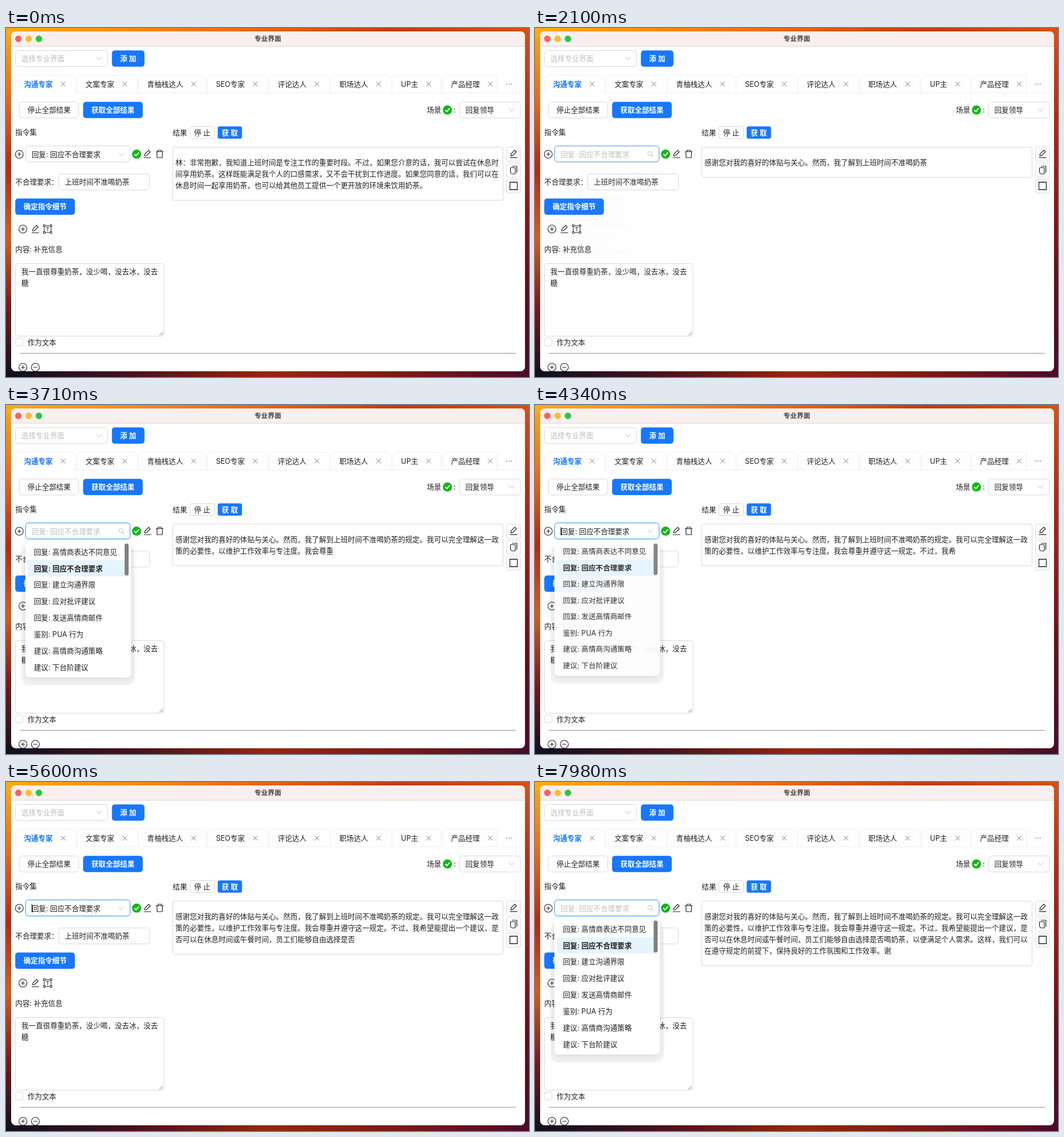
Recreate the animation shown at these times as an HTML page with a canvas. Size 917 by 611 pixels, loop 8 s.

```html
<!DOCTYPE html>
<html lang="zh-CN">
<head>
<meta charset="utf-8">
<title>专业界面</title>
<style>
html, body { margin: 0; width: 100%; height: 100%; overflow: hidden; background: #a02414; }
canvas { display: block; width: 917px; height: 611px; }
</style>
</head>
<body>
<canvas id="stage"></canvas>
<script>
const W = 917, H = 611, LOOP = 8000, EM = 12.6;
const ROW = 19.85, ROW_CHARS = 45, OPTION_H = 28.85;
const FONT = "Inter, 'Noto Sans CJK SC', 'Noto Sans CJK', sans-serif";
const BLUE = '#1677ff', INK = '#1f1f1f', LINE = '#d9d9d9', PALE = '#bfbfbf';

// Moments of the story, in ms
const CLEAR = 700, HOVER = 1540, OPEN = 2100, PICK = 4226, BLUR = 6800, REOPEN = 7280;
const BEAT = 140, BLINK = 475, FADE = 200;

const OLD_REPLY = '林：非常抱歉，我知道上班时间是专注工作的重要时段。不过，如果您介意的话，我可以尝试在休息时' +
  '间享用奶茶。这样既能满足我个人的口感需求，又不会干扰到工作进度。如果您同意的话，我们可以在' +
  '休息时间一起享用奶茶，也可以给其他员工提供一个更开放的环境来饮用奶茶。';
const NEW_REPLY = '感谢您对我的喜好的体贴与关心。然而，我了解到上班时间不准喝奶茶的规定。我可以完全理解这一政' +
  '策的必要性，以维护工作效率与专注度。我会尊重并遵守这一规定。不过，我希望能提出一个建议，是' +
  '否可以在休息时间或午餐时间，员工们能够自由选择是否喝奶茶，以便满足个人需求。这样，我们可以' +
  '在遵守规定的前提下，保持良好的工作氛围和工作效率。谢';
const OPTIONS = ['回复: 高情商表达不同意见', '回复: 回应不合理要求', '回复: 建立沟通界限', '回复: 应对批评建议',
  '回复: 发送高情商邮件', '鉴别: PUA 行为', '建议: 高情商沟通策略', '建议: 下台阶建议'];
const TABS = ['沟通专家', '文案专家', '青柚栈达人', 'SEO专家', '评论达人', '职场达人', 'UP主', '产品经理'];

// Typing pace: [time, characters received]
const PACE = [[CLEAR, 0], [OPEN, 31], [2660, 49], [4340, 80], [5600, 115], [7280, 148], [7980, 161]];

const canvas = document.getElementById('stage');
const c = canvas.getContext('2d');
const dpr = window.devicePixelRatio || 1;
canvas.width = W * dpr;
canvas.height = H * dpr;

const clamp = v => Math.max(0, Math.min(1, v));
const since = (t, start) => clamp((t - start) / FADE);

function received(t) {
  const q = Math.floor(t / BEAT) * BEAT;
  const i = PACE.findIndex(p => p[0] > q);
  if (i < 0) return NEW_REPLY.length;
  const [t0, n0] = PACE[i - 1], [t1, n1] = PACE[i];
  return Math.floor(n0 + (n1 - n0) * (q - t0) / (t1 - t0));
}

function setFont(weight, size = EM) {
  c.font = `${weight} ${size}px ${FONT}`;
}

function text(s, x, cy, color = INK, weight = 400, size = EM, align = 'left') {
  setFont(weight, size);
  c.fillStyle = color;
  c.textAlign = align;
  c.fillText(s, x, cy + size * .37);
}

function box(x, y, w, h, radius, fill, stroke, width = 1) {
  c.beginPath();
  c.roundRect(x, y, w, h, radius);
  if (fill) { c.fillStyle = fill; c.fill(); }
  if (stroke) { c.strokeStyle = stroke; c.lineWidth = width; c.stroke(); }
}

function fillRect(x, y, w, h, color) {
  c.fillStyle = color;
  c.fillRect(x, y, w, h);
}

// Each path is a flat list of x, y pairs around (x, y)
function strokes(x, y, color, width, ...paths) {
  c.beginPath();
  for (const p of paths)
    for (let i = 0; i < p.length; i += 2) c[i ? 'lineTo' : 'moveTo'](x + p[i], y + p[i + 1]);
  c.strokeStyle = color;
  c.lineWidth = width;
  c.stroke();
}

function disc(x, y, r, fill, stroke, width = 1.1) {
  c.beginPath();
  c.arc(x, y, r, 0, 7);
  if (fill) { c.fillStyle = fill; c.fill(); }
  if (stroke) { c.strokeStyle = stroke; c.lineWidth = width; c.stroke(); }
}

const chevron = (x, y) => strokes(x, y, PALE, 1, [-4.5, -2.3, 0, 2.7, 4.5, -2.3]);
const cross = (x, y) => strokes(x, y, '#777', 1, [-4, -4, 4, 4], [4, -4, -4, 4]);

function circled(x, y, plus) {
  disc(x, y, 7, null, INK);
  strokes(x, y, INK, 1.1, [-3.5, 0, 3.5, 0], plus ? [0, -3.5, 0, 3.5] : []);
}

function tick(x, y) {
  disc(x, y, 8, '#0fb812');
  strokes(x, y, '#fff', 1.9, [-4, 0, -1, 3, 4, -3]);
}

function pencil(x, y) {
  strokes(x, y, INK, 1.2, [-6.5, 6.5, 6.5, 6.5]);
  c.save();
  c.translate(x - 5, y + 3.5);
  c.rotate(-Math.PI / 4);
  strokes(0, 0, INK, 1.2, [0, 0, 3, -2, 12, -2, 12, 2, 3, 2, 0, 0]);
  c.restore();
}

function trash(x, y) {
  strokes(x, y, INK, 1.2, [-6.5, -4, 6.5, -4], [-5, -4, -4.5, 6.5, 4.5, 6.5, 5, -4]);
  box(x - 3, y - 6.5, 6, 2.5, 0, null, INK, 1.2);
}

function textFrame(x, y) {
  box(x - 6, y - 6, 12, 12, 0, null, INK);
  strokes(x, y, INK, 1, [-3, -3, 3, -3], [0, -3, 0, 3.5]);
  for (const dx of [-6, 6])
    for (const dy of [-6, 6]) box(x + dx - 1.5, y + dy - 1.5, 3, 3, 0, '#fff', INK);
}

function pages(x, y) {
  strokes(x, y, INK, 1.2, [-3, -7, 5.7, -7, 5.7, 4.5]);
  box(x - 5.5, y - 4.5, 8.5, 11, [1, 1, 1, 4], null, INK, 1.2);
}

const field = (x, y, w, h = 28, r = 5) => box(x, y, w, h, r, '#fff', LINE);

function button(label, x, y, w, primary, h = 28, r = 5) {
  if (primary) box(x - .3, y - .3, w + .6, h + .6, r, BLUE);
  else field(x, y, w, h, r);
  text(label, x + w / 2, y + h / 2, primary ? '#fff' : INK, primary ? 600 : 400, EM, 'center');
}

function strip(x, y, w, h, ...colors) {
  const g = w > h ? c.createLinearGradient(0, 0, W, 0) : c.createLinearGradient(0, 0, 0, H);
  colors.forEach((k, i) => g.addColorStop(i / (colors.length - 1), k));
  fillRect(x, y, w, h, g);
}

function wallpaper() {
  strip(0, H - 20, W, 20, '#0e1020', '#4a121c', '#96260f', '#7a1a18', '#4a0c28');
  strip(0, 0, 20, H, '#ffaa10', '#ee6a10', '#b8280e', '#dc5a18', '#7c1818', '#0e1020');
  strip(W - 20, 0, 20, H, '#d85014', '#b32a12', '#901814', '#5c0e1c', '#4a0c28');
  strip(0, 0, W, 14, '#ffaa10', '#f68a14', '#e8640f', '#c23a0e', '#d85014');
}

function titleBar() {
  fillRect(9, 6, 901, 26, '#f8efee');
  fillRect(9, 31.5, 901, 1, '#ddd5d4');
  ['#ff5f57', '#febc2e', '#28c840'].forEach((k, i) => disc(21.7 + 18 * i, 19, 5.7, k));
  text('专业界面', 459, 18.5, '#484242', 700, 11.8, 'center');
}

function tabs() {
  fillRect(16, 113, 886, 1, '#f0f0f0');
  c.save();
  c.beginPath();
  c.rect(16, 80, 842.5, 34);
  c.clip();
  let x = 16;
  TABS.forEach((label, i) => {
    setFont(400);
    const w = c.measureText(label).width;
    box(Math.round(x) + .5, 82.5, w + 55.6, 31, [7, 7, 0, 0], '#fefefe', '#f0f0f0');
    if (!i) fillRect(17, 112, w + 54, 2, '#fff');
    text(label, x + 15.4, 98, i ? INK : BLUE, i ? 400 : 600);
    cross(x + w + 33.8, 98.3);
    x += w + 57.7;
  });
  c.restore();
  fillRect(861, 82, 1, 32, '#e9e9e9');
  for (const dx of [-4, 0, 4]) disc(882 + dx, 98.3, .8, '#444');
}

function form() {
  field(16.5, 39.5, 161.5);
  text('选择专业界面', 27, 53.5, PALE);
  chevron(163, 53.3);
  button('添 加', 186, 39.5, 56.5, true);
  tabs();

  button('停止全部结果', 23.5, 129.5, 104);
  button('获取全部结果', 135.5, 129.5, 104, true);
  text('场景', 738, 143.5);
  tick(774, 143.5);
  text(':', 785, 143.5);
  field(795.5, 129.5, 106.5);
  text('回复领导', 805.5, 143.5);
  chevron(886.5, 143.3);

  text('指令集', 16.3, 182.5);
  text('结果', 292.3, 183);
  button('停 止', 322.5, 172.5, 43, false, 21, 3.5);
  button('获 取', 371.5, 172.5, 42, true, 21, 3.5);

  circled(23.3, 221, true);
  tick(229, 220.8);
  pencil(248, 220.5);
  trash(269.5, 220.5);
  text('不合理要求：', 16.3, 269.5);
  field(92.5, 255.5, 159);
  text('上班时间不准喝奶茶', 103, 269.5);
  button('确定指令细节', 16.5, 298.8, 104, true);
  circled(29.7, 352, true);
  pencil(51.5, 352);
  textFrame(73, 352);

  text('内容: 补充信息', 16.3, 387.5);
  field(16.5, 412.5, 260.5, 127);
  text('我一直很尊重奶茶，没少喝，没去冰，没去', 27, 426.7);
  text('糖', 27, 426.7 + ROW);
  strokes(275, 538, '#777', .9, [-6, 0, 0, -6], [-2.5, 0, 0, -2.5]);
  field(16.5, 543, 13.5, 13.5, 3.5);
  text('作为文本', 37.7, 550);
  fillRect(24, 569, 870, 1, '#929292');
  circled(29.7, 594, true);
  circled(51.5, 594, false);
}

function result(t) {
  const reply = t < CLEAR ? OLD_REPLY : NEW_REPLY.slice(0, received(t));
  const rows = Math.max(1, Math.ceil(reply.length / ROW_CHARS));
  field(292.5, 208.5, 579, Math.round(33.5 + ROW * rows), 2.5);
  for (let i = 0; i < rows; i++)
    text(reply.slice(i * ROW_CHARS, (i + 1) * ROW_CHARS), 297, 235.6 + ROW * i);

  for (let i = 0; i < 3; i++) field(877.5, 208.5 + 28 * i, 25, 24.5, 3);
  pencil(890, 220.3);
  pages(890, 249);
  box(883.5, 270, 13, 13, 0, null, INK, 1.3);
}

// 0 = closed, 1 = fully open
function openness(t) {
  if (t >= PICK && t < REOPEN) return 1 - since(t, PICK) ** 5;
  return 1 - (1 - since(t, t < PICK ? OPEN : REOPEN)) ** 5;
}

function caretOn(t) {
  const start = [REOPEN, PICK, OPEN].find(s => t >= s);
  const blurred = t > BLUR && t < REOPEN;
  return start && !blurred && t - start > 60 && Math.floor((t - start - 45) / BLINK) % 2 === 0;
}

function picker(t) {
  const hover = since(t, HOVER);
  const glow = t < REOPEN ? since(t, OPEN) * (1 - since(t, BLUR)) : since(t, REOPEN);
  const mix = (a, b) => Math.round(a + (b - a) * hover);
  if (glow) box(33, 205, 186, 31, 7, `rgba(5,145,255,${.1 * glow})`);
  box(34.5, 206.5, 183, 28, 5, '#fff', `rgb(${mix(217, 64)},${mix(217, 150)},255)`.replace('255)', mix(217, 255) + ')'));

  const searching = (t >= OPEN && t < PICK) || t >= REOPEN;
  text('回复: 回应不合理要求', 45, 221, openness(t) > 0 && searching ? PALE : INK);
  if (searching) {
    disc(201.3, 219.8, 3.5, null, PALE, 1);
    strokes(201.3, 219.8, PALE, 1.1, [2.5, 2.5, 5.7, 5.7]);
  } else chevron(202.3, 220.7);
  if (caretOn(t)) fillRect(45, 214, 1, 14, '#000');
}

function dropdown(open) {
  if (open <= 0) return;
  c.save();
  c.globalAlpha = open;
  c.translate(0, 239);
  c.scale(1, .8 + .2 * open);
  c.translate(0, -239);
  box(27, 247, 199, 244, 14, 'rgba(0,0,0,.045)');
  c.save();
  c.shadowColor = 'rgba(0,0,0,.1)';
  c.shadowBlur = 12 * dpr;
  c.shadowOffsetY = 4 * dpr;
  box(34, 239, 185, 238, 7, '#fff');
  c.restore();
  OPTIONS.forEach((label, i) => {
    const y = 257 + OPTION_H * i, picked = i === 1;
    if (picked) box(38, y - OPTION_H / 2, 177, OPTION_H, 4, '#e6f4ff');
    text(label, 49, y, INK, picked ? 600 : 400);
  });
  box(208, 242.5, 7, 56, 3.5, '#808080');
  c.restore();
}

function draw(t) {
  c.setTransform(dpr, 0, 0, dpr, 0, 0);
  wallpaper();
  c.save();
  box(9, 6, 901, 595, 8, '#fff');
  c.clip();
  titleBar();
  form();
  result(t);
  picker(t);
  dropdown(openness(t));
  c.restore();
}

const began = performance.now();
function loop() {
  draw((performance.now() - began) % LOOP);
  requestAnimationFrame(loop);
}
loop();
</script>
</body>
</html>
```
